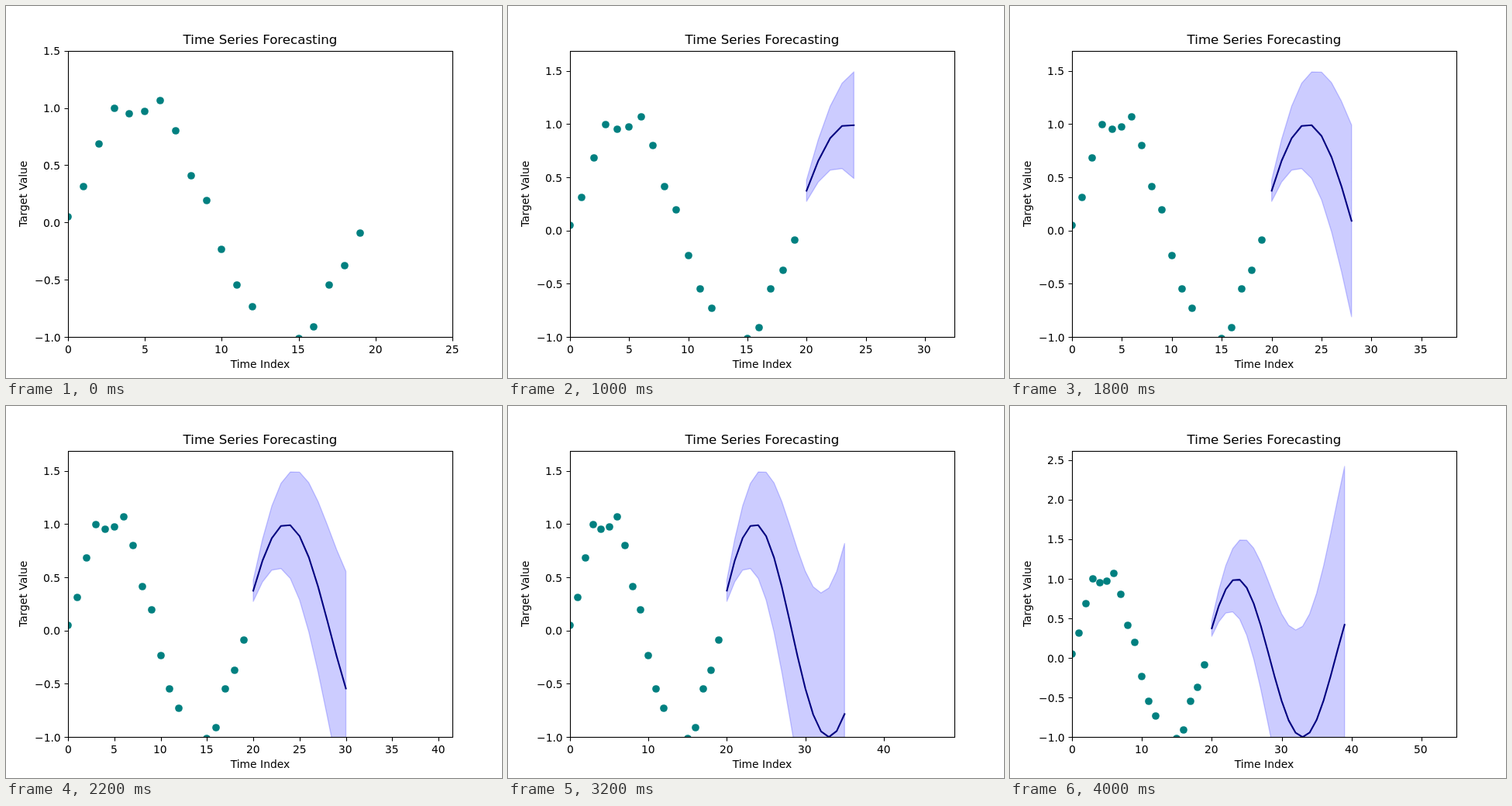
An HTML page that plays this animation: 640x480 px, repeating every 4200 ms.

```html
<!DOCTYPE html>
<html lang="en">
<head>
<meta charset="utf-8">
<title>Time Series Forecasting</title>
<style>
  html, body { margin: 0; width: 100%; height: 100%; overflow: hidden; background: #fff; }
  svg { display: block; }
  text { font: 13.889px "DejaVu Sans", sans-serif; fill: #000; }
  .title { font-size: 16.667px; }
  .mid { text-anchor: middle; }
  .axis { fill: none; stroke: #000; stroke-width: 1.111; }
</style>
</head>
<body>
<svg width="640" height="480" viewBox="0 0 640 480">
  <defs><clipPath id="plot"><rect x="80" y="58" width="497" height="370"/></clipPath></defs>
  <rect width="640" height="480" fill="#fff"/>
  <g clip-path="url(#plot)">
    <path id="band" fill="#00f" fill-opacity=".2" stroke="#00f" stroke-opacity=".2"
          stroke-width="1.389" stroke-linejoin="round"/>
    <g id="dots" fill="#008080"></g>
    <path id="line" fill="none" stroke="#000080" stroke-width="2.083"
          stroke-linejoin="round" stroke-linecap="square"/>
  </g>
  <path id="ticks" class="axis"/>
  <rect class="axis" x="80.5" y="58.5" width="496" height="369"/>
  <g id="labels"></g>
  <text class="title mid" x="328" y="49">Time Series Forecasting</text>
  <text class="mid" x="328" y="467">Time Index</text>
  <text class="mid" transform="translate(27 242.4) rotate(-90)">Target Value</text>
</svg>
<script>
const NS = "http://www.w3.org/2000/svg";
const STEP = 200, STEPS = 21;
const LEFT = 80, WIDTH = 496, BOTTOM = 427.2, HEIGHT = 369.6;
const FIRST = 20, Y_MIN = -1;

const history = [0.05, 0.312, 0.684, 0.996, 0.949, 0.972, 1.067, 0.8, 0.41, 0.195,
  -0.234, -0.547, -0.732, -1.2, -1.2, -1.015, -0.914, -0.547, -0.373, -0.091];

const byId = id => document.getElementById(id);
const mean = i => Math.sin(i / 3);
const spread = i => 0.1 * (i - FIRST + 1);
const upper = i => mean(i) + spread(i);
const lower = i => mean(i) - spread(i);

function add(parent, tag, attrs) {
  const el = document.createElementNS(NS, tag);
  for (const name in attrs) el.setAttribute(name, attrs[name]);
  return parent.appendChild(el);
}

const dots = history.map(() => add(byId("dots"), "circle", { r: 4.861 }));

// Left edge of an index label, set on whole pixels
function labelX(x, text) {
  if (text.length === 1) return Math.round(x - 4.42);
  return Math.round(x - ("24".includes(text[0]) ? 9 : 9.65));
}

function draw(count) {
  const steps = Array.from({ length: count }, (_, n) => FIRST + n);
  const xMax = 25 + 1.5 * count;
  const yMax = Math.max(1.5, ...steps.map(i => upper(i) + 0.2));
  const px = x => LEFT + x / xMax * WIDTH;
  const py = y => BOTTOM - (y - Y_MIN) / (yMax - Y_MIN) * HEIGHT;

  dots.forEach((dot, i) => {
    dot.setAttribute("cx", Math.round(px(i)));
    dot.setAttribute("cy", Math.round(py(history[i])));
  });

  // A lone vertical edge sits on the pixel grid
  const snap = v => count === 1 ? Math.round(v) + 0.5 : v;
  const trace = (list, f, fit = v => v) =>
    list.map(i => fit(px(i)).toFixed(3) + " " + fit(py(f(i))).toFixed(3)).join("L");
  const back = steps.slice().reverse();
  byId("band").setAttribute("d", count
    ? "M" + trace(steps, upper, snap) + "L" + trace(back, lower, snap) + "Z" : "");
  byId("line").setAttribute("d", count > 1 ? "M" + trace(steps, mean) : "");

  const labels = byId("labels");
  labels.textContent = "";
  let marks = "";
  const gap = xMax > 45 ? 10 : 5;
  for (let x = 0; x <= xMax; x += gap) {
    const text = String(x);
    marks += `M${Math.round(px(x)) + 0.5} 427.5v5`;
    add(labels, "text", { x: labelX(px(x), text), y: 448 }).textContent = text;
  }
  for (let y = Y_MIN; y <= yMax; y += 0.5) {
    marks += `M80.5 ${Math.round(py(y)) + 0.5}h-5`;
    add(labels, "text", { x: y < 0 ? 37 : 48, y: Math.round(py(y) + 5.5) })
      .textContent = y.toFixed(1).replace("-", "\u2212");
  }
  byId("ticks").setAttribute("d", marks);
}

let shown = -1;
function tick() {
  const count = Math.floor(performance.now() / STEP) % STEPS;
  if (count !== shown) draw(shown = count);
  requestAnimationFrame(tick);
}
tick();
</script>
</body>
</html>
```
